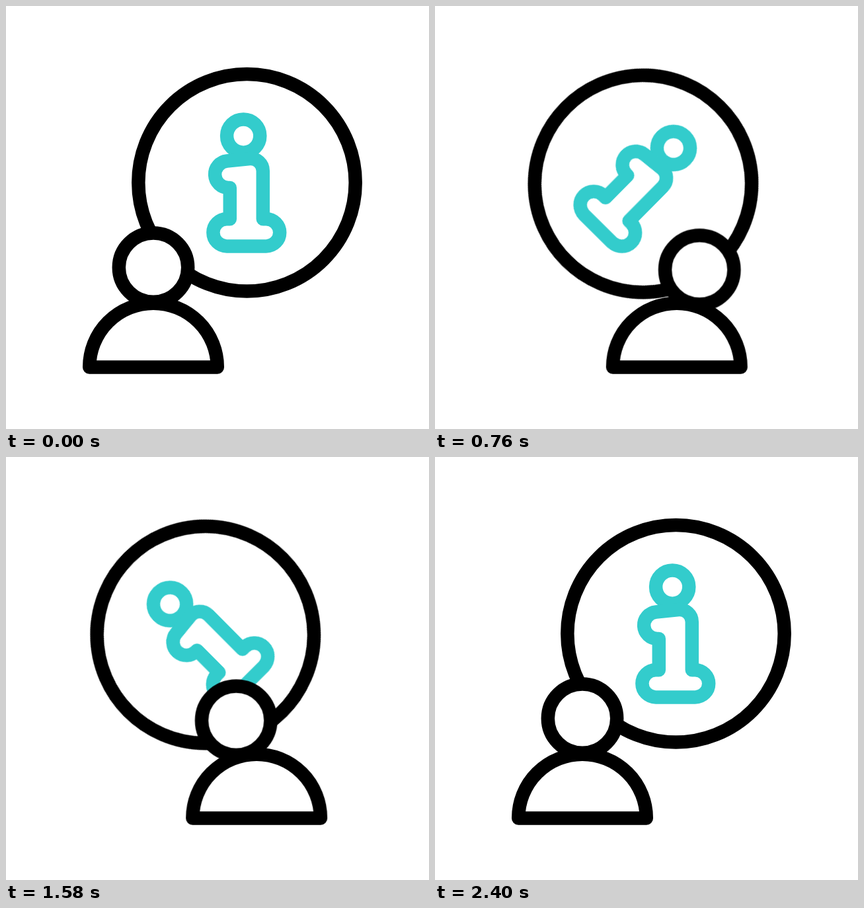
An HTML page for the animation above (2.42 s loop, 640 by 640 pixels).

```html
<!DOCTYPE html>
<html lang="en">
<head>
<meta charset="utf-8">
<title>Information</title>
<style>
  html, body { margin: 0; width: 100%; height: 100%; overflow: hidden; background: #fff; }
  svg { display: block; width: 100vw; height: 100vh; }
  .line { fill: #fff; stroke: #000; stroke-width: 20.5; stroke-linejoin: round; }
  .info { fill: none; stroke: #3cc; }

  /* 2400 ms of motion, then a 20 ms hold */
  .bubble, .tilt, .person, .head {
    animation: 2420ms cubic-bezier(.3333, 0, .6667, 1) infinite;
  }
  .bubble { animation-name: bubble; }
  .tilt { animation-name: tilt; transform-origin: 364.5px 273.1px; }
  .person { animation-name: person; }
  .head { animation-name: head; }

  @keyframes bubble {
    0%, 99.174%, 100% { transform: translateX(0); }
    49.587% { transform: translateX(-77px); }
  }
  @keyframes tilt {
    0%, 99.174%, 100% { transform: rotate(0deg); }
    33.058% { transform: rotate(45deg); }
    66.116% { transform: rotate(-45deg); }
  }
  @keyframes person {
    0%, 99.174%, 100% { transform: translateX(0); }
    49.587% { transform: translateX(205px); }
  }
  @keyframes head {
    0%, 99.174%, 100% { transform: translate(0, 0); }
    24.793% {
      transform: translate(39.2px, 4px);
      animation-timing-function: cubic-bezier(.3333, 0, .6667, .64);
    }
    49.587% {
      transform: translate(0, 0);
      animation-timing-function: cubic-bezier(.3333, .36, .6667, 1);
    }
    74.38% { transform: translate(-39.2px, 4px); }
  }
</style>
</head>
<body>
<svg viewBox="0 0 640 640">
  <g class="bubble">
    <g class="tilt">
      <circle class="line" cx="364.5" cy="267.3" r="164.2"/>
      <circle class="line info" cx="359.2" cy="196.6" r="25.1"/>
      <path class="line info" d="M388.8 322.2H393.6a20.6 20.6 0 0 1 0 41.2H334a20.6 20.6 0 0 1 0-41.2H338.8V275H336.6a20.3 20.3 0 0 1-2.2-40.5L368.6 231.1A18.4 18.4 0 0 1 388.8 249.5Z"/>
    </g>
  </g>
  <g class="person">
    <path class="line" d="M126.2 546.4a96.8 96.8 0 0 1 193.6 0Z"/>
    <circle class="line head" cx="223" cy="395.6" r="52.2"/>
  </g>
</svg>
</body>
</html>
```
